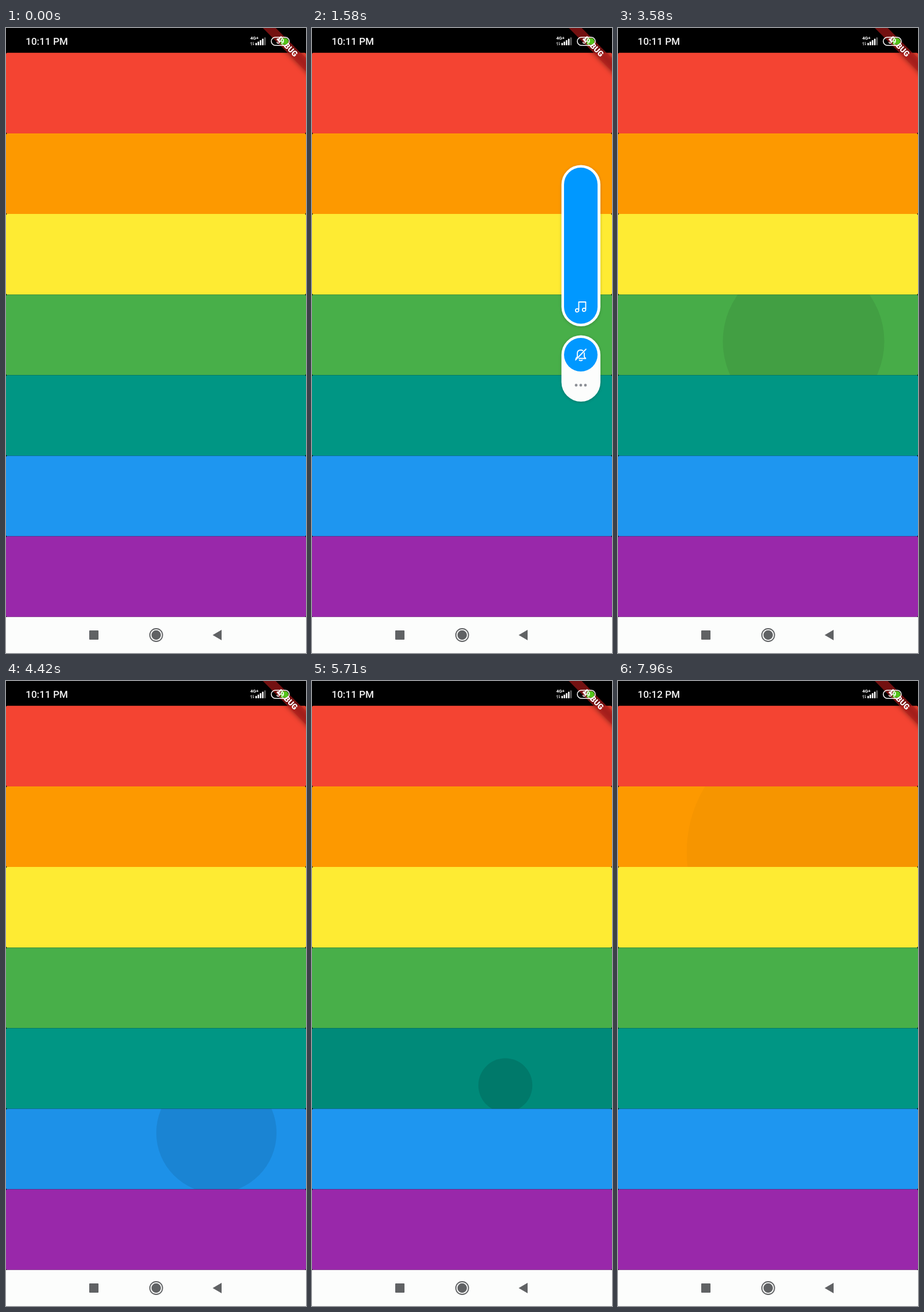
These frames come from a looping animation (519 by 1079 pixels, 8000 ms). An HTML page with a canvas:

```html
<!DOCTYPE html>
<html lang="en">
<head>
<meta charset="utf-8">
<title>Colour keys</title>
<style>
html, body { margin: 0; width: 100%; height: 100%; overflow: hidden; background: #000; }
canvas { display: block; }
</style>
</head>
<body>
<canvas id="stage" width="519" height="1079"></canvas>
<script>
const ctx = document.getElementById('stage').getContext('2d');
const LOOP = 8000, W = 519, TOP = 42.8, ROW = 139.13, DP = 1.32;
const COLORS = ['#f44432', '#fd9900', '#feeb33', '#48af49', '#009684', '#1e96f0', '#9928aa'];
const WHITE = '#fcfdfc', BLUE = '#0098ff';

// Taps: time down, time held, row, x, y
const TAPS = [
  [2435, 65, 1, 325, 255], [2935, 65, 2, 320, 395], [3395, 107, 3, 321, 541],
  [3805, 145, 4, 335, 675], [4265, 108, 5, 364, 780], [4725, 145, 6, 350, 945],
  [5225, 50, 5, 350, 800], [5577, 265, 4, 334.5, 698], [6055, 65, 3, 330, 545],
  [6475, 65, 2, 330, 405], [6895, 140, 1, 330, 270], [7355, 145, 0, 335, 125],
  [7765, 43, 1, 336, 295]
];

const clamp = v => Math.max(0, Math.min(1, v));
const easeOut = v => 1 - (1 - clamp(v)) ** 3;
const black = a => `rgba(0,0,0,${a})`;

function fillBox(x, y, w, h, r, color) {
  ctx.beginPath();
  ctx.roundRect(x, y, w, h, r);
  ctx.fillStyle = color;
  ctx.fill();
}

function disc(x, y, r, color) {
  ctx.beginPath();
  ctx.arc(x, y, r, 0, 7);
  ctx.fillStyle = color;
  ctx.fill();
}

function line(path, width, color, fill) {
  ctx.lineWidth = width;
  ctx.strokeStyle = ctx.fillStyle = color;
  const p = new Path2D(path);
  fill ? ctx.fill(p) : ctx.stroke(p);
}

function label(text, x, y, font, color = '#fff', align = 'left') {
  ctx.font = font + ' Roboto, sans-serif';
  ctx.textAlign = align;
  ctx.fillStyle = color;
  ctx.fillText(text, x, y);
}

function drawRipple([down, held, row, x, y], t) {
  const age = t - down, after = Math.max(0, age - held);
  if (age < 0 || after > 200) return;
  const top = TOP + row * ROW;
  const reach = Math.hypot(Math.max(x, W - x), Math.max(y - top, top + ROW - y));
  const radius = Math.min(reach, reach * Math.min(age, held) / 1000 + after * DP);
  const glow = clamp((Math.min(age, held, 200) - after) / 200);
  ctx.save();
  ctx.beginPath();
  ctx.roundRect(0, top, W, ROW, 2.6);
  ctx.clip();
  ctx.fillStyle = black(0.12 * glow);
  ctx.fillRect(0, top, W, ROW);
  disc(x, y, radius, black(0.12 * (1 - after / 200)));
  ctx.restore();
}

function drawBanner() {
  ctx.save();
  ctx.translate(W, 0);
  ctx.rotate(Math.PI / 4);
  ctx.scale(DP, DP);
  ctx.filter = 'blur(5px)';
  ctx.fillStyle = black(0.5);
  ctx.fillRect(-60, 28, 120, 12);
  ctx.filter = 'none';
  ctx.fillStyle = 'rgba(183,28,28,.63)';
  ctx.fillRect(-60, 28, 120, 12);
  label('DEBUG', 0, 37.7, '900 10.2px', '#fff', 'center');
  ctx.restore();
}

function drawStatus(t) {
  label(t < 7300 ? '10:11 PM' : '10:12 PM', 34, 29, '500 17px', '#f4f4f4');
  label('4G+', 422.5, 20, '700 8px');
  line('M424.5 30V24.5l-1.5 2M427.5 24v5.5l1.5-2', 1, '#ccc');
  for (let i = 0; i < 5; i++) {
    const h = 4 + i * 2.4;
    fillBox(431.5 + i * 3.8, 29.8 - h, 2.6, h, 0.6, i < 4 ? '#fff' : '#666');
  }
  fillBox(475, 17.5, 13.5, 11, [2, 5.5, 5.5, 2], '#52c41a');
  ctx.beginPath();
  ctx.roundRect(459, 16, 31, 14, 7);
  ctx.lineWidth = 1.5;
  ctx.strokeStyle = '#fff';
  ctx.stroke();
  label('39', 474.5, 27.3, '700 12px', '#fff', 'center');
}

function drawNav() {
  ctx.fillStyle = WHITE;
  ctx.fillRect(0, 1016.8, W, 63);
  fillBox(144, 1040, 16, 16, 1, '#606264');
  disc(259.8, 1048, 8.2, '#606264');
  ctx.beginPath();
  ctx.arc(259.8, 1048, 11, 0, 7);
  ctx.lineWidth = 1.8;
  ctx.strokeStyle = '#606264';
  ctx.stroke();
  line('M357.5 1048L373 1039V1057Z', 1, '#606264', true);
}

function drawVolume(t) {
  const shown = easeOut((t - 20) / 310) * (1 - clamp((t - 1680) / 350) ** 2);
  if (shown <= 0) return;
  const level = 0.67 + 0.33 * clamp((t - 300) / 650);
  ctx.save();
  ctx.globalAlpha = clamp(shown * 1.5);
  ctx.translate((1 - shown) * 92, 0);
  ctx.shadowColor = black(0.2);
  ctx.shadowBlur = 5;
  ctx.shadowOffsetY = 1;
  fillBox(431.5, 236.5, 67.5, 278.5, 33.75, WHITE);
  fillBox(431.5, 530.5, 67.5, 114.5, 33.75, WHITE);
  ctx.shadowColor = 'transparent';

  ctx.save();
  ctx.beginPath();
  ctx.roundRect(436, 241, 58, 269.5, 29);
  ctx.clip();
  ctx.fillStyle = '#e9ecef';
  ctx.fillRect(436, 241, 58, 270);
  ctx.fillStyle = BLUE;
  ctx.fillRect(436, 510.5 - 269.5 * level, 58, 270);
  ctx.restore();
  disc(465, 564, 29, BLUE);

  ctx.lineCap = ctx.lineJoin = 'round';
  line('M461.5 487.5V473H473.5V486M461.5 487.5a2.8 2.8 0 1 1-5.6 0a2.8 2.8 0 1 1 5.6 0M473.5 486.5a2.8 2.8 0 1 1-5.6 0a2.8 2.8 0 1 1 5.6 0', 1.8, '#fff');
  line('M459 567.5V562q0-6 6-6q2 0 3.5 1M471 561V567.5L473.5 570.5H462M456.5 570.5L459 567.5M456 573L474 554.5M462.5 573.5q2.5 1.8 5 0', 1.8, '#fff');
  for (const x of [457, 465, 473]) disc(x, 616.7, 2.4, '#8b8f95');
  ctx.restore();
}

function draw() {
  const t = performance.now() % LOOP;
  ctx.fillStyle = '#000';
  ctx.fillRect(0, 0, W, 1079);
  COLORS.forEach((c, i) => fillBox(0, TOP + i * ROW, W, ROW, 2.6, c));
  TAPS.forEach(tap => drawRipple(tap, t));
  drawBanner();
  drawStatus(t);
  drawNav();
  drawVolume(t);
  requestAnimationFrame(draw);
}
draw();
</script>
</body>
</html>
```
